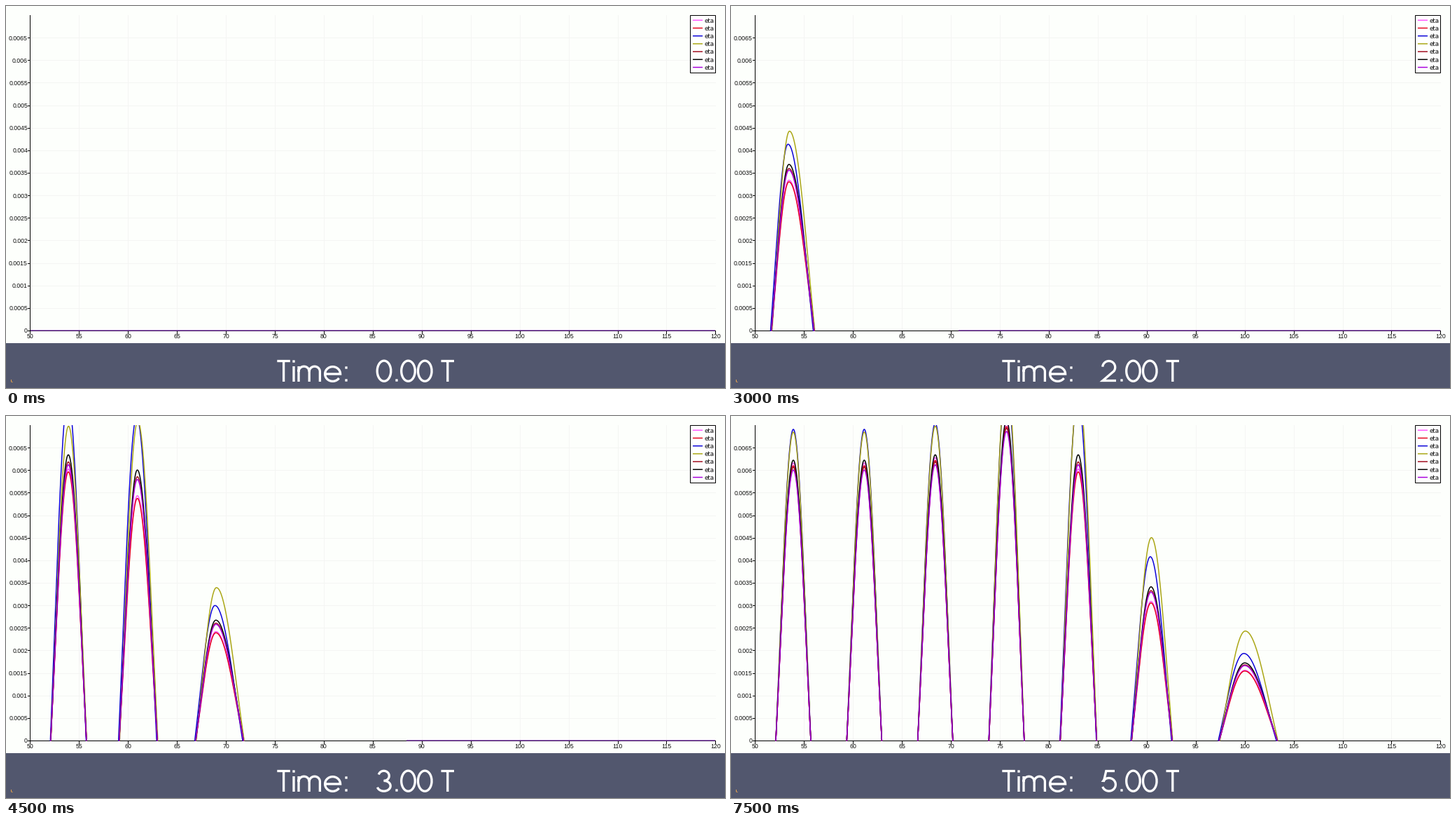
These frames come from a looping animation (1027x545 px, 8000 ms). A matplotlib script:

```python
import numpy as np
import matplotlib.pyplot as plt
from matplotlib.animation import FuncAnimation
from matplotlib.patches import Rectangle

W, H, DPI = 1027, 545, 64
PT = 72 / DPI
LEFT, RIGHT, TOP, BASE = 34.4, 1013.4, 13, 463
STEP_X, STEP_Y = (RIGHT - LEFT) / 14, 32.15

COLORS = dict(pink="#ff55ff", red="#e4001e", blue="#0a00d8", olive="#aaa614",
              brown="#a00c1e", black="#000000", purple="#a800dc")
SHIFT = dict(blue=-1.3, olive=0.8)

fig = plt.figure(figsize=(W / DPI, H / DPI), dpi=DPI, facecolor="#fdfffc")
ax = fig.add_axes([0, 0, 1, 1])
ax.set_xlim(0, W)
ax.set_ylim(H, 0)
ax.axis("off")


def line(xs, ys, color="black", width=1, **kw):
    return ax.plot(xs, ys, color=color, lw=width * PT, **kw)[0]


def label(x, y, text, size=8.7, font="Liberation Sans", **kw):
    ax.text(x, y, text, fontsize=size * PT, family=font, color="#101010",
            va="center_baseline", **kw)


def strokes(paths):
    """Join several pen strokes into one broken polyline."""
    points = []
    for path in paths:
        points += list(path) + [(np.nan, np.nan)]
    return np.array(points).reshape(-1, 2).T


# Pen-drawn caption lettering
def arc(cx, cy, rx, ry, start, end):
    a = np.radians(np.linspace(start, end, 40))
    return list(zip(cx + rx * np.cos(a), cy - ry * np.sin(a)))


def letter_t(x):
    return [[(x, 506.5), (x + 18.5, 506.5)], [(x + 9.3, 506.5), (x + 9.3, 536)]]


def dot(x, y):
    return [(x, y - 1.7), (x, y + 1.7)]


def zero(x):
    return arc(x, 520.7, 9.8, 14.6, 0, 360)


DIGITS = [
    [zero(540)],
    [[(536, 508.5), (542, 506.5), (542, 536)]],
    [arc(539.7, 515.5, 9, 9, 175, -38) + [(531, 534.5), (550, 534.5)]],
    [arc(539.7, 513.4, 7.6, 7.1, 165, -90),
     arc(539.7, 527.8, 9.5, 7.4, 90, -165)],
    [[(545.5, 536), (545.5, 507.5), (530.5, 528.7), (551, 528.7)]],
    [[(548, 506.5), (535.8, 506.5), (532.6, 520.5)]
     + arc(539.8, 525.8, 9.6, 9.3, 145, -160)],
]
CAPTION = (
    letter_t(387.3)
    + [[(411, 514), (411, 536)], dot(411, 507), [(418, 514), (418, 536)]]
    + [arc(x, 521.6, 7.6, 7.4, 180, 0) + [(x + 7.6, 536)] for x in (425.6, 440.8)]
    + [[(455.6, 525)] + arc(466.6, 525, 11, 10.4, 0, 325)]
    + [dot(486, 516), dot(486, 534), dot(558, 534), zero(574.5), zero(598.3)]
    + letter_t(621.5)
)

# Grid, axes and ticks
grid = "#f4f5f3"
for i in range(15):
    x = LEFT + i * STEP_X
    if 0 < i < 14:
        line([x, x], [TOP, BASE], grid)
    line([x, x], [BASE, 467], zorder=3)
    label(x, 470, str(50 + 5 * i), ha="center")
for i in range(14):
    y = BASE - i * STEP_Y
    if i:
        line([LEFT, RIGHT], [y, y], grid)
    line([31, LEFT], [y, y], zorder=3)
    label(31, y, f"{i * 0.0005:.4f}".rstrip("0").rstrip("."), ha="right")
line([LEFT, LEFT], [TOP, BASE], zorder=6)
line([LEFT, RIGHT], [BASE, BASE], zorder=3)

# Legend
ax.add_patch(Rectangle((977, 13), 36.4, 82, fc="white", ec="black", lw=PT, zorder=7))
for i, color in enumerate(COLORS.values()):
    y = 20 + 11.2 * i
    line([981, 995], [y + 0.3, y + 0.3], color, 1.5, zorder=8, snap=False,
         solid_capstyle="butt")
    label(997, y, "eta", 8.8, "DejaVu Sans", zorder=8)

# Caption band
ax.add_patch(Rectangle((0, 481), W, H - 481, fc="#52576e", lw=0, zorder=4))
line([7.5, 7.5, 9], [533.5, 536, 536.5], "#e0a050", 1, zorder=5)
pen = dict(color="white", width=3.3, zorder=5, solid_capstyle="butt",
           solid_joinstyle="miter")
line(*strokes(CAPTION), **pen)
digit = line([], [], **pen)

plot_area = Rectangle((LEFT, TOP), RIGHT - LEFT, BASE + 0.5 - TOP,
                      transform=ax.transData)
curves = {name: line([], [], color, 1.5, zorder=5) for name, color in COLORS.items()}
for curve in curves.values():
    curve.set_clip_path(plot_area)
calm = line([], [], "#6a1ca0", 1.6, zorder=4, alpha=0.75, solid_capstyle="butt")


# Wave train: k counts crests back from the front, age is periods since the
# first crest appeared.
def placement(k, age):
    """Crest position and half widths; the leading crests run ahead and widen."""
    lead = np.exp(-1.4 * k)
    pull = 14.4 * age * lead - 8 * np.exp(-(k - 0.5) ** 2)
    peak = 89 + 101.3 * (2 * age - k) + pull
    return peak, 25 + 3.8 * age * lead, 25 + (11 + 3.5 * age) * lead


def crest_height(k, age):
    """Leading crests decay; the steady train has one overshoot behind them."""
    if k < 2:
        return (237 + 149 * k) / (1 + 0.38 * (age - k))
    return 400 + 57 * np.exp(-2 * (k - age) ** 2)


def relative_heights(k, age):
    red = np.clip(0.85 + 0.045 * k, 0.895, 0.98)
    return dict(pink=red + 0.01, red=red,
                blue=1.11 + 0.11 * np.exp(-(k - 1.5) ** 2),
                olive=max(1.1, 1.2 + 0.07 * age - 0.09 * k),
                brown=0.975, black=1, purple=0.965)


def crest(peak, left, right, height):
    """Cosine sharpened by its second harmonic."""
    u = np.linspace(-1, 1, 90)
    c = np.cos(np.pi * u / 2)
    x = peak + np.where(u < 0, left, right) * u
    return list(zip(x, BASE - height * (c + 0.25 * c * c) / 1.25))


def update(frame):
    period = frame // 3
    age = period - 2
    paths = {name: [] for name in COLORS}
    for k in range(2 * age + 1):
        peak, left, right = placement(k, age)
        height = crest_height(k, age)
        for name, ratio in relative_heights(k, age).items():
            shift = SHIFT.get(name, 0) * np.exp(-k * k / 4)
            paths[name].append(crest(peak + shift, left, right, height * ratio))
    for name, curve in curves.items():
        curve.set_data(*strokes(paths[name]))
    start = np.clip(325 + 247 * age, 35, RIGHT)
    calm.set_data([start, RIGHT], [BASE, BASE])
    digit.set_data(*strokes(DIGITS[period]))
    return [*curves.values(), calm, digit]


anim = FuncAnimation(fig, update, frames=16, interval=500, repeat=True,
                     repeat_delay=0, blit=False)
plt.show()
```
